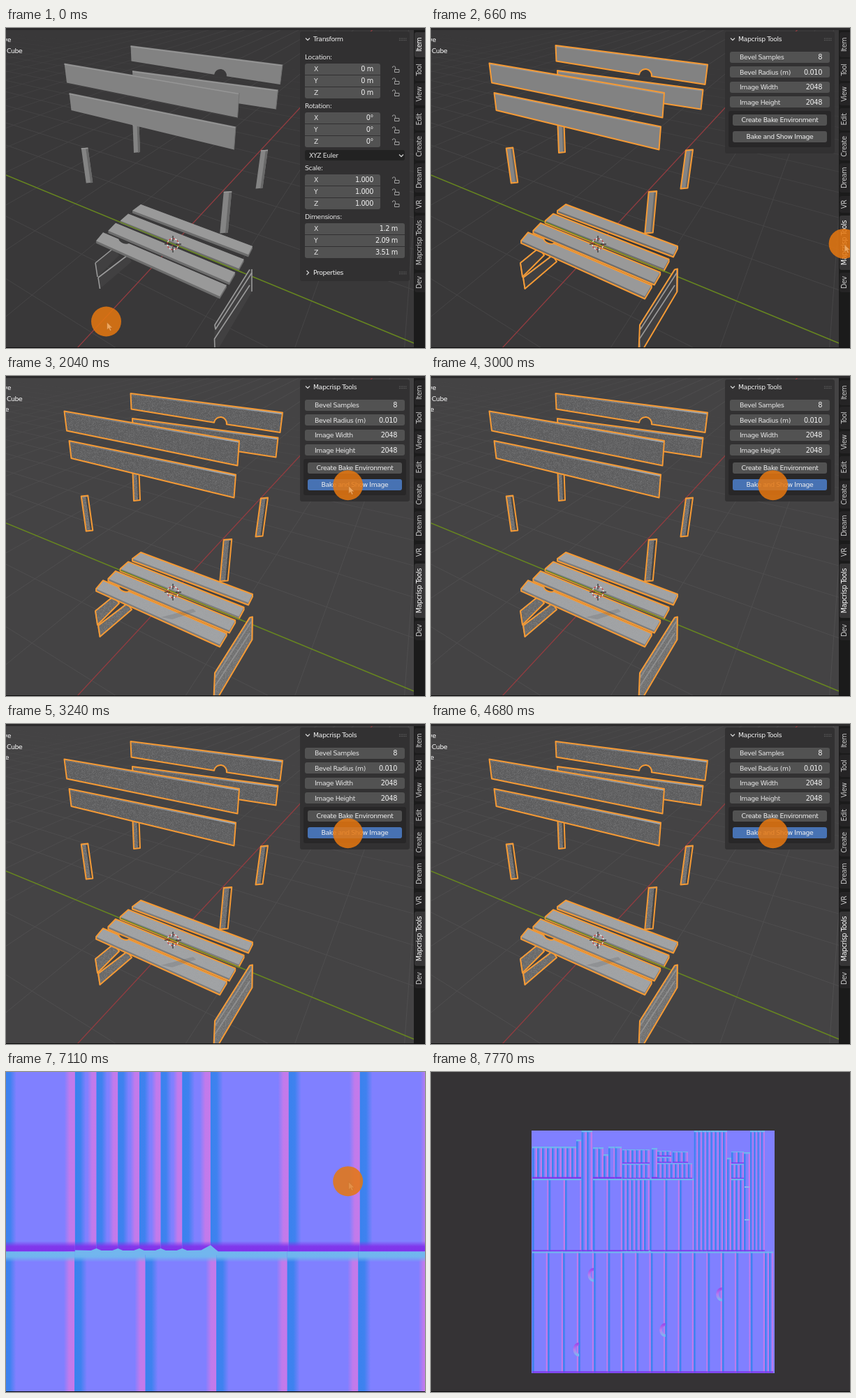
Recreate the animation shown at these times as an HTML page with a canvas. Size 600 by 459 pixels, loop 7.8 s.

```html
<!DOCTYPE html>
<html lang="en">
<head>
<meta charset="utf-8">
<style>
html, body { margin: 0; width: 100%; height: 100%; overflow: hidden; background: #393839; }
canvas { display: block; width: 600px; height: 459px; }
</style>
</head>
<body>
<canvas id="stage" width="600" height="459"></canvas>
<script>
const ctx = document.getElementById('stage').getContext('2d');
const LOOP = 7800;
const T = { select: 150, tab: 560, render: 1140, done: 1600, bake: 1950, busy: 2460, image: 6600, zoom: 7320, end: 7558 };
const ADDON = 'Mapcrisp Tools';
const ORANGE = '#f59a35';
const clamp = (v, a = 0, b = 1) => Math.min(b, Math.max(a, v));
const lerp = (a, b, k) => a + (b - a) * k;

let seed = 7;
const rand = () => (seed = (seed * 16807) % 2147483647) / 2147483647;

function noise(tone) {
  const c = document.createElement('canvas');
  c.width = c.height = 192;
  const g = c.getContext('2d'), img = g.createImageData(192, 192);
  for (let i = 0; i < img.data.length; i += 4) {
    img.data.fill(tone(rand()), i, i + 3);
    img.data[i + 3] = 255;
  }
  g.putImageData(img, 0, 0);
  return ctx.createPattern(c, 'repeat');
}
const darkNoise = noise(r => 22 + 160 * r ** 1.8);
const lightNoise = noise(r => 70 + 150 * r ** 0.85);

// ---------- basic helpers ----------
function path(p, close = true) {
  ctx.beginPath();
  for (let i = 0; i < p.length; i += 2) ctx.lineTo(p[i], p[i + 1]);
  if (close) ctx.closePath();
}
function line(p, color, width = 1) {
  path(p, false);
  ctx.strokeStyle = color;
  ctx.lineWidth = width;
  ctx.stroke();
}
function rect(x, y, w, h, color) {
  ctx.fillStyle = color;
  ctx.fillRect(x, y, w, h);
}
function round(x, y, w, h, r, color) {
  ctx.beginPath();
  ctx.roundRect(x, y, w, h, r);
  ctx.fillStyle = color;
  ctx.fill();
}
function text(s, x, y, align = 'left', color = '#e6e6e6', size = 9.3) {
  ctx.font = size + 'px "DejaVu Sans", sans-serif';
  ctx.letterSpacing = '-0.4px';
  ctx.textAlign = align;
  ctx.textBaseline = 'alphabetic';
  ctx.fillStyle = color;
  ctx.fillText(s, x, y + 3.4);
}

// ---------- viewport ----------
const ORIGIN = [239, 310], VP_RED = [610, -90], VP_GREEN = [-702, -82];

// floor lines towards one vanishing point, fading with distance
function gridFamily(axis, other, step, color) {
  for (let i = -7; i < 14; i++) {
    const k = i * step;
    if (!i || 1 + k < 0.15) continue;
    const x = (ORIGIN[0] + k * axis[0]) / (1 + k), y = (ORIGIN[1] + k * axis[1]) / (1 + k);
    ctx.globalAlpha = clamp(1.1 - k * 0.65, 0, 1);
    line([other[0], other[1], lerp(other[0], x, 6), lerp(other[1], y, 6)], color);
  }
  ctx.globalAlpha = 1;
}

const boards = [
  [178.5, 25, 396, 52.5, 392.5, 81, 179.5, 47.5],
  [181, 61, 389.5, 88.5, 386.5, 116.5, 182, 85],
  [83.5, 50.5, 334, 93, 331.5, 128.5, 87, 78.5],
  [90.5, 93, 329, 141.5, 326.5, 174.5, 93.5, 118]
];
// top centre, bottom centre, width
const posts = [
  [186, 138, 187.5, 179, 9],
  [112.5, 171.5, 119.5, 222.5, 9.5],
  [370, 174.5, 362.5, 230.5, 10],
  [317.5, 234, 312, 294.5, 11.5]
];
const leftRails = [
  [128, 337, 155, 315, 162, 326, 131, 357],
  [132, 358, 174, 326, 180, 335, 134.5, 374]
];
const rightRail = [349, 346.5, 353, 345.5, 352.5, 378, 303, 462, 297.5, 462, 299, 426];
const rightEdges = [[349, 346.5, 299, 426, 300, 432, 352, 351], [349, 369, 298.5, 446, 299, 459], [352, 346, 352, 378]];
const plank = i => [193 - 18 * i, 253 + 13.4 * i, 353 - 12.4 * i, 313 + 18.7 * i,
  347 - 13.6 * i, 325 + 20 * i, 181 - 17.3 * i, 262 + 14.4 * i];
const lower = (p, d) => p.map((v, i) => i % 2 ? v + d : v);

function solid(s, fill, grain, amount = s.grain) {
  ctx.fillStyle = fill;
  ctx.fill();
  if (!s.rendered) return;
  ctx.globalAlpha = amount;
  ctx.fillStyle = grain;
  ctx.fill();
  ctx.globalAlpha = 1;
}
function outline(s) {
  if (!s.selected) return;
  ctx.strokeStyle = ORANGE;
  ctx.lineWidth = 2;
  ctx.stroke();
}
function boardPath(p, arch) {
  path(p);
  if (!arch) return;
  ctx.beginPath();
  ctx.moveTo(p[0], p[1]);
  ctx.lineTo(p[2], p[3]);
  ctx.lineTo(p[4], p[5]);
  ctx.arc(307, 68, 9, 0.15, Math.PI + 0.15, true);
  ctx.lineTo(p[6], p[7]);
  ctx.closePath();
}
function drawBoard(s, i) {
  const p = boards[i];
  boardPath(p, i === 0);
  solid(s, s.rendered ? '#666667' : '#828282', darkNoise);
  const shine = ctx.createLinearGradient(p[0], 0, p[2], 0);
  shine.addColorStop(0, 'rgba(150,156,162,.2)');
  shine.addColorStop(1, 'rgba(172,178,184,.9)');
  line(lower(p.slice(0, 4), 1.5), s.rendered ? shine : '#969696', s.rendered ? 2.5 : 1.5);
  line(p.slice(2, 6), s.rendered ? '#4c4c4c' : '#707070');
  boardPath(p, i === 0);
  outline(s);
}
function drawPost(s, [x, y, u, v, w]) {
  const h = w / 2, p = [x - h, y + 1, x + h, y, u + h, v - 1, u - h, v];
  path(p);
  solid(s, s.rendered ? '#777778' : '#848484', darkNoise);
  path([x + h * 0.35, y + 1, x + h, y, u + h, v - 1, u + h * 0.35, v]);
  ctx.fillStyle = s.rendered ? 'rgba(40,40,40,.6)' : '#686868';
  ctx.fill();
  line([x - h, y + 1.5, x + h, y + 1], '#9a9a9a', 1.5);
  path(p);
  outline(s);
}
function drawRail(s, p, edges, fill) {
  path(p);
  solid(s, s.rendered ? fill : '#414041', darkNoise);
  for (const e of edges) line(e, s.rendered ? '#909090' : '#9a9a9a', 1.6);
  path(p);
  outline(s);
}
function drawPlank(s, i) {
  const p = plank(i), b = lower(p, 3.5);
  const hull = [p[0], p[1], p[2], p[3], b[2], b[3], b[4], b[5], b[6], b[7], p[6], p[7]];
  const grain = s.grain * s.grain;
  path(hull);
  solid(s, s.rendered ? '#7c7c7c' : '#6d6d6d', lightNoise, grain);
  path(p);
  solid(s, s.rendered ? '#a1a3a5' : '#999', lightNoise, grain);
  path(hull);
  outline(s);
}

function drawCursor3d() {
  const [x, y] = ORIGIN;
  for (let i = 0; i < 16; i++) {
    ctx.beginPath();
    ctx.arc(x, y, 8, i * Math.PI / 8, (i + 1) * Math.PI / 8);
    ctx.strokeStyle = i % 2 ? '#eee' : '#c8383a';
    ctx.lineWidth = 1.2;
    ctx.stroke();
  }
  for (const [a, b] of [[1, 0], [-1, 0], [0, 1], [0, -1]])
    line([x + a * 4, y + b * 4, x + a * 12, y + b * 12], '#161616');
}

function drawViewport(s) {
  const grid = s.rendered ? '#4f4e4f' : '#464546';
  rect(0, 0, 600, 459, s.rendered ? '#444344' : '#393839');
  gridFamily(VP_RED, VP_GREEN, 0.12, grid);
  gridFamily(VP_GREEN, VP_RED, 0.087, grid);
  line([102, 459, 527, 0], '#923c40', 1.3);
  line([0, 211, 584, 452], '#67861f', 1.4);

  ctx.lineJoin = 'round';
  drawBoard(s, 0);
  drawBoard(s, 1);
  drawBoard(s, 2);
  drawPost(s, posts[0]);
  drawBoard(s, 3);
  posts.slice(1).forEach(p => drawPost(s, p));
  leftRails.forEach(p => drawRail(s, p, [p.slice(0, 4), [p[0], p[1], p[6], p[7]]], '#747474'));
  for (let i = 0; i < 4; i++) drawPlank(s, i);
  if (s.rendered) {
    path([222, 346, 268, 334, 272, 338, 238, 349]);
    ctx.fillStyle = 'rgba(70,70,75,.18)';
    ctx.fill();
  }
  // hand hole in the front plank
  ctx.beginPath();
  ctx.ellipse(169, 305, 8, 4, 0.4, 0, Math.PI);
  ctx.fillStyle = s.rendered ? '#4a4a4a' : '#3c3c3c';
  ctx.fill();
  outline(s);
  drawRail(s, rightRail, rightEdges, '#7c7c7c');
  line([164, 278.7, 338, 350.5], '#67861f', 1.4);
  drawCursor3d();

  text('ve', 7, 17, 'right', '#fff');
  text('Cube', 1, 33, 'left', '#fff');
  if (s.rendered) text(s.done ? 'e' : '24', s.done ? 4 : 8, 48, 'right', '#fff');
  rect(0, 0, 600, 3, '#2c2b2c');
}

// ---------- side bar ----------
const tabs = [['Item', 24, 18], ['Tool', 60, 16], ['View', 95, 16], ['Edit', 131, 16], ['Create', 170, 20],
  ['Dream', 215, 21], ['VR', 253, 12], [ADDON, 308, 39], ['Dev', 365, 14]];

function drawTabs(active) {
  rect(584, 3, 16, 456, '#1b1b1b');
  tabs.forEach(([name, y, half], i) => {
    const on = i === active;
    round(585, y - half, 17, half * 2, 3, on ? '#363536' : '#252425');
    ctx.save();
    ctx.translate(592, y);
    ctx.rotate(-Math.PI / 2);
    text(name, 0, 0, 'center', on ? '#fff' : '#c8c8c8', 9.6);
    ctx.restore();
  });
}
function chevron(x, y, down) {
  line(down ? [x - 3, y - 1.5, x, y + 1.5, x + 3, y - 1.5] : [x - 1.5, y - 3, x + 1.5, y, x - 1.5, y + 3], '#d0d0d0', 1.2);
}
function header(title, y, open) {
  chevron(432, y, open);
  text(title, 440, y, 'left', '#f2f2f2');
  for (let i = 0; i < 10; i++) rect(563 + (i % 5) * 2.3, y - 1.5 + (i > 4) * 2.5, 1.2, 1.2, '#606060');
}
function lock(x, y) {
  ctx.beginPath();
  ctx.arc(x - 2.5, y - 2, 2.2, Math.PI, 0);
  ctx.lineTo(x - 0.3, y + 0.5);
  ctx.strokeStyle = '#a0a0a0';
  ctx.lineWidth = 1;
  ctx.stroke();
  ctx.strokeRect(x - 1.5, y + 0.5, 6.5, 4);
}
function triple(label, labelY, values, width, locks) {
  text(label, 428, labelY);
  values.forEach((v, i) => {
    const y = labelY + 17 + i * 17;
    round(428, y - 8, width, 16, i === 0 ? [3, 3, 0, 0] : i === 2 ? [0, 0, 3, 3] : 0, '#525252');
    text('XYZ'[i], 441, y);
    text(v, 418 + width, y, 'right', '#f0f0f0', 9.8);
    if (locks) lock(558, y);
  });
}
function drawTransform() {
  round(421, 5, 157, 358, 3, '#313031');
  header('Transform', 16, true);
  triple('Location:', 42, ['0 m', '0 m', '0 m'], 108, true);
  triple('Rotation:', 112, ['0°', '0°', '0°'], 108, true);
  round(428, 175, 143, 15, 3, '#222');
  text('XYZ Euler', 434, 182.5);
  chevron(566, 183, true);
  triple('Scale:', 201, ['1.000', '1.000', '1.000'], 108, true);
  triple('Dimensions:', 271, ['1.2 m', '2.09 m', '3.51 m'], 143, false);
  header('Properties', 351, false);
}
function button(label, y, color) {
  round(432, y - 8, 135, 16, 3, color);
  text(label, 499.5, y, 'center', '#f0f0f0');
}
function drawAddon(s) {
  round(421, 5, 157, 175, 3, '#323132');
  header(ADDON, 16, true);
  [['Bevel Samples', '8'], ['Bevel Radius (m)', '0.010'], ['Image Width', '2048'], ['Image Height', '2048']]
    .forEach(([label, value], i) => {
      const y = 42 + i * 21.4;
      round(428, Math.round(y) - 8, 143, 16, 3, '#525252');
      text(label, 442, y);
      text(value, 560, y, 'right', '#f0f0f0', 9.8);
    });
  round(426, 119, 147, 52, 3, '#282728');
  button('Create Bake Environment', 132, s.hover ? '#656565' : '#525252');
  button('Bake and Show Image', 156, s.pressed ? '#4772b3' : '#525252');
}

// ---------- normal map ----------
const MAP = { x: 144, y: 84, size: 348, cx: 318.3, cy: 257.6, zoom: 4.975 };

function band(x, y, w, h, rgb, dx, dy) {
  const fx = dx < 0 ? x + w : x, fy = dy < 0 ? y + h : y;
  const g = ctx.createLinearGradient(fx, fy, fx + dx * w, fy + dy * h);
  g.addColorStop(0, `rgba(${rgb},1)`);
  g.addColorStop(0.5, `rgba(${rgb},.92)`);
  g.addColorStop(1, `rgba(${rgb},0)`);
  ctx.fillStyle = g;
  ctx.fillRect(x, y, w, h);
}
function cell(x, y, w, h) {
  const e = Math.min(3.6, w / 2), v = h < 30 ? 1.8 : 3;
  rect(x, y, w, h, '#8080ff');
  band(x, y, e, h, '58,130,238', 1, 0);
  band(x + w - e * 0.85, y, e * 0.85, h, '198,122,234', -1, 0);
  band(x, y, w, v, '112,184,238', 0, 1);
  band(x, y + h - v, w, v, '128,50,234', 0, -1);
}
function strips(x, end, y, bottom, n) {
  const w = (end - x) / n;
  for (let i = 0; i < n; i++) cell(x + i * w, y, w, bottom - y);
}
function dent(x, y) {
  const g = ctx.createLinearGradient(0, y - 9, 0, y + 9);
  g.addColorStop(0, '#9c46e8');
  g.addColorStop(0.5, '#b87cf0');
  g.addColorStop(1, '#76bcf0');
  ctx.beginPath();
  ctx.ellipse(x, y, 6.5, 8, 0, Math.PI / 2, Math.PI * 1.5);
  ctx.strokeStyle = g;
  ctx.lineWidth = 4;
  ctx.stroke();
}
function drawMap(zoom) {
  rect(0, 0, 600, 459, '#353335');
  ctx.save();
  ctx.translate(MAP.cx, MAP.cy);
  ctx.scale(zoom, zoom);
  ctx.translate(-MAP.cx, -MAP.cy);
  rect(MAP.x, MAP.y, MAP.size, MAP.size, '#8080ff');
  const mid = MAP.cy, p = 20.5, x0 = 274.2, thin = 6.17;

  strips(145, 208, 107, 153, 9);
  strips(208, 215, 97, 153, 1);
  strips(232, 247, 108, 153, 2);
  strips(247, 254, 118, 153, 1);
  strips(254, 273, 107, 153, 2);
  strips(274, 313, 111, 131, 6);
  strips(274, 313, 132, 153, 6);
  strips(316, 324, 109, 153, 1);
  strips(324, 344, 113, 121, 3);
  strips(324, 344, 122, 130, 3);
  strips(346, 368, 114, 130, 3);
  strips(324, 374, 131, 153, 8);
  strips(430, 448, 114, 131, 2);
  strips(430, 448, 132, 153, 3);

  strips(145, 215.5, 153, mid, 3);
  strips(215.5, 231, 84, mid, 2);
  strips(232, x0 - p, 153, mid, 1);
  strips(x0 - p, x0, 153, mid, 1);
  strips(x0, x0 + 5 * thin, 153, mid, 5);
  strips(x0 + 5 * thin, 313.2, 153, mid, 1);
  strips(313.2, x0 + 3 * p, 153, mid, 1);
  strips(x0 + 3 * p, x0 + 5 * p, 153, mid, 2);
  strips(x0 + 5 * p, 424, 84, mid, 8);
  strips(424, 430, 123, mid, 1);
  strips(430, 448, 153, mid, 3);
  strips(448, 457, 115, mid, 1);
  strips(457, 478, 84, mid, 4);
  for (const y of [164, 211]) rect(449, y, 7, 2, '#8fb4f0');

  strips(145, x0 - 2 * p, mid, 431.5, 4);
  strips(x0 - 2 * p, x0 + 10 * p - 1, mid, 431.5, 12);
  strips(x0 + 10 * p - 1, 490, mid, 431.5, 2);
  // scalloped seam under the narrow strips
  const seam = [x0, mid - 0.4];
  for (let i = 1; i < 6; i++) {
    const x = x0 + i * thin;
    seam.push(x - 1.6, mid - 0.3, x, mid - 0.9, x + 1.4, mid - 0.3);
  }
  path([...seam, 310.5, mid - 0.4, 313.2, mid - 1.9, 315.4, mid, 315.4, mid + 1, x0, mid + 1]);
  ctx.fillStyle = '#72b6ee';
  ctx.fill();

  dent(233, 291);
  dent(212, 398);
  dent(x0 + 3 * p, 370);
  dent(x0 + 7 * p - 1, 319);
  ctx.restore();
}

// ---------- pointer ----------
const moves = [[30, 143.5, 421], [480, 592, 311], [640, 592, 311], [1020, 491, 132], [1650, 491, 132], [1860, 489.7, 156.7]];

function pointerAt(t) {
  let i = 0;
  while (i < moves.length - 2 && t > moves[i + 1][0]) i++;
  const [a, x, y] = moves[i], [b, u, v] = moves[i + 1];
  const k = clamp((t - a) / (b - a)), e = k * k * (3 - 2 * k);
  return [lerp(x, u, e), lerp(y, v, e)];
}
function drawPointer(t) {
  const [x, y] = pointerAt(t);
  ctx.beginPath();
  ctx.arc(x, y, 21.5, 0, Math.PI * 2);
  ctx.fillStyle = 'rgba(230,119,16,.86)';
  ctx.fill();
  if (t > T.busy && t < T.image) return;
  ctx.save();
  ctx.translate(x + 1, y + 1);
  path([0, 0, 0, 11, 2.6, 8.6, 4.6, 12.6, 6.4, 11.8, 4.6, 8, 8, 8]);
  ctx.globalAlpha = t > T.busy ? 0.4 : 0.85;
  ctx.fillStyle = '#f3b26c';
  ctx.fill();
  ctx.strokeStyle = '#b8651c';
  ctx.lineWidth = 0.6;
  ctx.stroke();
  ctx.restore();
}

function draw(t) {
  if (t >= T.image) {
    const step = t < T.zoom ? 0 : clamp(Math.floor((t - T.zoom) / 34) + 1, 0, 8);
    drawMap(MAP.zoom ** (1 - step / 8));
    if (t < T.end) drawPointer(t);
  } else {
    const s = {
      selected: t >= T.select,
      rendered: t >= T.render,
      done: t >= T.done,
      grain: lerp(1, 0.12, clamp((t - 1200) / (T.done - 1200))),
      hover: t > 960 && t < 1740,
      pressed: t >= T.bake
    };
    drawViewport(s);
    drawTabs(t < T.tab ? 0 : 7);
    if (t < T.tab) drawTransform();
    else drawAddon(s);
    drawPointer(t);
  }
  rect(0, 458, 600, 1, '#0c0c0c');
}

const start = performance.now();
function frame() {
  draw((performance.now() - start) % LOOP);
  requestAnimationFrame(frame);
}
draw(0);
requestAnimationFrame(frame);
</script>
</body>
</html>
```
